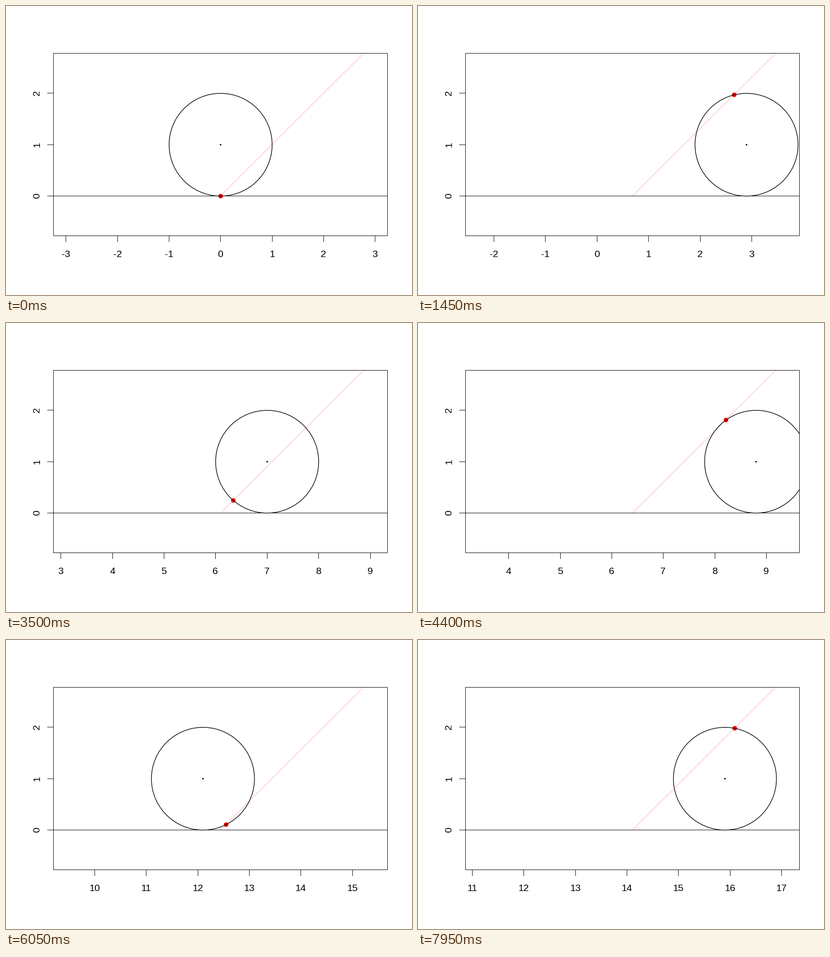
A matplotlib script for the animation above (8 s loop, 885x632 px).

```python
import math

import numpy as np
import matplotlib.pyplot as plt
from matplotlib.animation import FuncAnimation
from matplotlib.patches import Circle, Rectangle

W, H, DPI = 885, 632, 100
FRAMES, INTERVAL = 160, 50
PX = 72 / DPI                      # one pixel in points

# Margins are counted in text lines; crisp lines sit on whole pixels
LINE = 25.3
X0, X1 = 4.1 * LINE, W - 2.1 * LINE
Y0, Y1 = 4.1 * LINE, H - 5.1 * LINE
UNIT = (X1 - X0) / 6.48            # pixels per data unit
MID = (X0 + X1) / 2                # view centre
GROUND = (Y0 + Y1) / 2 + UNIT      # the y = 0 level
LEFT, RIGHT, TOP, BOTTOM = map(math.floor, (X0, X1, Y0, Y1))
HALF = 3.24
TICK = LINE / 2
FONT = dict(family="Liberation Sans", size=LINE / 1.2 * PX, color="black")

fig = plt.figure(figsize=(W / DPI, H / DPI), dpi=DPI, facecolor="white")
ax = fig.add_axes([0, 0, 1, 1])
ax.set_xlim(0, W)
ax.set_ylim(H, 0)
ax.axis("off")


def line(xs, ys, color="black", width=1.0, z=1):
    return ax.plot(xs, ys, color=color, lw=width * PX, zorder=z)[0]


def dot(radius, color, z):
    return ax.add_patch(Circle((MID, GROUND), radius, fc=color, ec="none", zorder=z))


# Fixed frame, ground and vertical axis
frame = (LEFT, TOP), RIGHT - LEFT, BOTTOM - TOP
ax.add_patch(Rectangle(*frame, fill=False, ec="black", lw=PX, zorder=6, snap=True))
floor_y = math.floor(GROUND)
line([LEFT, RIGHT], [floor_y, floor_y], z=2)
for v in range(3):
    y = math.floor(GROUND - v * UNIT)
    line([LEFT - TICK, LEFT], [y, y])
    ax.text(X0 - 1.2 * LINE, y, str(v), rotation=90, rotation_mode="anchor",
            ha="center", va="baseline", **FONT)

# The 45 degree sight line stays put because the view follows it
start_x, start_y = math.floor(MID) + 0.5, floor_y + 0.5
line([start_x, start_x + start_y - TOP], [start_y, TOP],
     color="pink", width=1.3, z=1.5)

pen = dot(5, "red", 3)
hub = dot(1.7, "black", 4)
wheel = line([], [], width=1.4, z=5)
wheel.set_clip_path(Rectangle(*frame, transform=ax.transData))

ticks = [line([], []) for _ in range(7)]
labels = [ax.text(0, Y1 + 1.8 * LINE, "", ha="center", va="baseline", **FONT)
          for _ in ticks]

phi = np.linspace(0, 2 * math.pi, 64)


def update(i):
    t = i / 10
    x, y = t - math.sin(t), 1 - math.cos(t)
    base = x - y

    def sx(v):
        return MID + (v - base) * UNIT

    pen.center = (sx(x), GROUND - y * UNIT)
    hub.center = (sx(t), GROUND - UNIT)
    wheel.set_data(sx(t - np.sin(t + phi)), GROUND - (1 - np.cos(t + phi)) * UNIT)

    first = math.ceil(base - HALF)
    for k, (tick, label) in enumerate(zip(ticks, labels)):
        v = first + k
        shown = v <= base + HALF
        tick.set_visible(shown)
        label.set_visible(shown)
        px = math.floor(sx(v))
        tick.set_data([px, px], [BOTTOM, BOTTOM + TICK])
        label.set_x(px)
        label.set_text(str(v))
    return [pen, hub, wheel, *ticks, *labels]


anim = FuncAnimation(fig, update, frames=FRAMES, interval=INTERVAL,
                     repeat=True, repeat_delay=0, blit=False)
plt.show()
```
